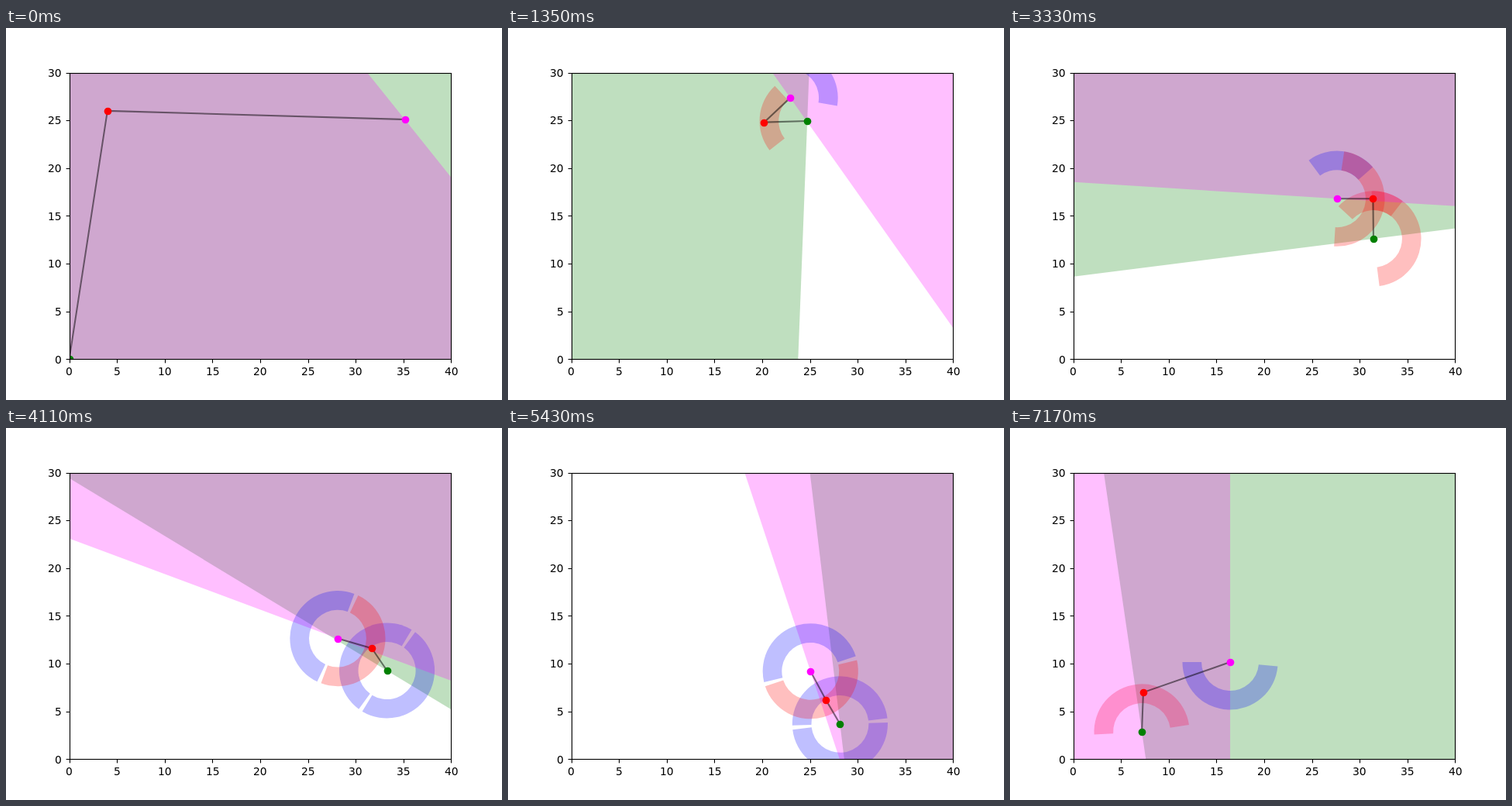
An HTML page that plays this animation: 640x480 px, repeating every 7.2 s.

```html
<!DOCTYPE html>
<html lang="en">
<head>
<meta charset="utf-8">
<title>Followers</title>
<style>
  html, body { margin: 0; width: 100%; height: 100%; overflow: hidden; background: #fff; }
  svg { display: block; width: 640px; height: 480px; }
  text { font: 13.89px "DejaVu Sans", sans-serif; }
</style>
</head>
<body>
<svg id="stage" viewBox="0 0 640 480">
  <clipPath id="plot"><rect x="82" y="58" width="492.5" height="369.5"/></clipPath>
  <g id="scene" clip-path="url(#plot)"></g>
  <g id="axes" stroke="#000" stroke-width="1.11" fill="none"></g>
  <g id="labels"></g>
</svg>
<script>
const STEP = 30, FRAMES = 240, UNIT = 12.32, DIGIT = 8.84;
const NEAR = 3, FAR = 5;
const px = x => 81.6 + x * UNIT;
const py = y => 427.2 - y * UNIT;
const snap = v => Math.floor(v + 0.5) + 0.5;
const mix = (a, b, k) => a + (b - a) * k;
const $ = id => document.getElementById(id);

function set(el, attrs) {
  for (const k in attrs) el.setAttribute(k, attrs[k]);
}
function add(parent, tag, attrs) {
  const el = document.createElementNS("http://www.w3.org/2000/svg", tag);
  set(el, attrs);
  return parent.appendChild(el);
}

// The leader walks straight from corner to corner.
const leader = {
  times: [0, 75, 165, 240],
  points: [[4, 26], [31, 24], [32, 6], [7, 7]]
};

// Followers drift between poses: offset from the leader, then heading in degrees.
const beats = [0, 45, 82, 111, 159, 204, 239];
const followers = [
  {
    color: "#008000",
    points: [[-4, -26, 45], [4.52, 0.14, 177.8], [0.46, -3.35, 95], [0.04, -4.2, 97.2],
      [2.9, -0.75, 52.9], [0, -4.4, -6], [-0.15, -4.13, 8.35]]
  },
  {
    color: "#ff00ff",
    points: [[31.14, -0.9, 218.7], [2.73, 2.56, 35.3], [-2.96, -1.24, 96.8], [-3.77, 0, 86.4],
      [-3.41, 1.9, 67], [0.27, 4.13, 4.8], [9.1, 3.17, -180]]
  }
];

// Ring sectors relative to the heading, and the frames in which they are on.
const sectors = [
  { from: -45, to: 40, on: 23, off: 135 },
  { from: 0, to: 175, on: 135, off: FRAMES },
  { from: -180, to: -5, on: 64, off: 222 }
];

function locate(times, frame) {
  let i = 0;
  while (i < times.length - 2 && frame >= times[i + 1]) i++;
  return [i, (frame - times[i]) / (times[i + 1] - times[i])];
}

function leaderAt(frame) {
  const [i, k] = locate(leader.times, frame);
  return [0, 1].map(j => mix(leader.points[i][j], leader.points[i + 1][j], k));
}

// Each turn is finished before the move that goes with it.
function poseAt(points, frame) {
  const [i, k] = locate(beats, frame);
  const turn = Math.min(1, k * 1.6);
  return [k, k, turn].map((t, j) => mix(points[i][j], points[i + 1][j], t));
}

// A sector turns red while the leader is inside it.
function sectorColor(dx, dy, heading, { from, to }) {
  const distance = Math.hypot(dx, dy);
  const bearing = Math.atan2(-dy, -dx) * 180 / Math.PI;
  const sweep = ((bearing - heading - from) % 360 + 360) % 360;
  const inside = distance >= NEAR && distance <= FAR && sweep <= to - from;
  return inside ? "#ff0000" : "#0000ff";
}

function polar(x, y, radius, degrees) {
  const a = degrees * Math.PI / 180;
  return `${px(x + radius * Math.cos(a)).toFixed(2)} ${py(y + radius * Math.sin(a)).toFixed(2)}`;
}

function halfPlane(x, y, heading) {
  const points = [-90, -45, 45, 90].map(a => polar(x, y, 150, heading + a));
  return `M${points.join("L")}Z`;
}

function ringSector(x, y, from, to) {
  const outer = FAR * UNIT, inner = NEAR * UNIT;
  return `M${polar(x, y, FAR, from)}A${outer} ${outer} 0 0 0 ${polar(x, y, FAR, to)}` +
    `L${polar(x, y, NEAR, to)}A${inner} ${inner} 0 0 1 ${polar(x, y, NEAR, from)}Z`;
}

// Labels start on whole pixels; share is the part of the width left of the anchor.
function label(value, x, y, share) {
  const width = String(value).length * DIGIT;
  const text = add($("labels"), "text", { x: Math.round(x - width * share), y: Math.round(y) });
  text.textContent = value;
}

function buildAxes() {
  const left = snap(px(0)), right = snap(px(40)), top = snap(py(30)), bottom = snap(py(0));
  add($("axes"), "rect", { x: left, y: top, width: right - left, height: bottom - top });
  for (let v = 0; v <= 40; v += 5) {
    add($("axes"), "path", { d: `M${snap(px(v))} ${bottom}v4.86` });
    label(v, px(v), 448, 0.5);
    if (v > 30) continue;
    add($("axes"), "path", { d: `M${left} ${snap(py(v))}h-4.86` });
    label(v, 71.9, py(v) + 5.3, 1);
  }
}

function buildScene() {
  const scene = $("scene");
  for (const f of followers) {
    f.field = add(scene, "path", { fill: f.color, "fill-opacity": 0.25 });
    f.rings = sectors.map(() => add(scene, "path", { "fill-opacity": 0.25 }));
  }
  const link = add(scene, "polyline", {
    fill: "none", stroke: "#000", "stroke-opacity": 0.5,
    "stroke-width": 2.08, "stroke-linejoin": "round"
  });
  const dot = color => add(scene, "circle", { r: 4.86, fill: color });
  const leaderDot = dot("#ff0000");
  for (const f of followers) f.dot = dot(f.color);
  return { link, leaderDot };
}

buildAxes();
const { link, leaderDot } = buildScene();

function placeDot(dot, x, y) {
  set(dot, { cx: snap(px(x)), cy: snap(py(y)) });
}

function draw(frame) {
  const [lx, ly] = leaderAt(frame);
  const ends = followers.map(f => {
    const [dx, dy, heading] = poseAt(f.points, frame);
    const x = lx + dx, y = ly + dy;
    set(f.field, { d: halfPlane(x, y, heading) });
    sectors.forEach((s, i) => {
      const active = frame >= s.on && frame < s.off;
      set(f.rings[i], {
        d: active ? ringSector(x, y, heading + s.from, heading + s.to) : "",
        fill: sectorColor(dx, dy, heading, s)
      });
    });
    placeDot(f.dot, x, y);
    return `${px(x)},${py(y)}`;
  });
  placeDot(leaderDot, lx, ly);
  set(link, { points: `${ends[0]} ${px(lx)},${py(ly)} ${ends[1]}` });
}

const start = performance.now();
function tick() {
  draw(Math.floor((performance.now() - start) / STEP) % FRAMES);
  requestAnimationFrame(tick);
}
tick();
</script>
</body>
</html>
```
